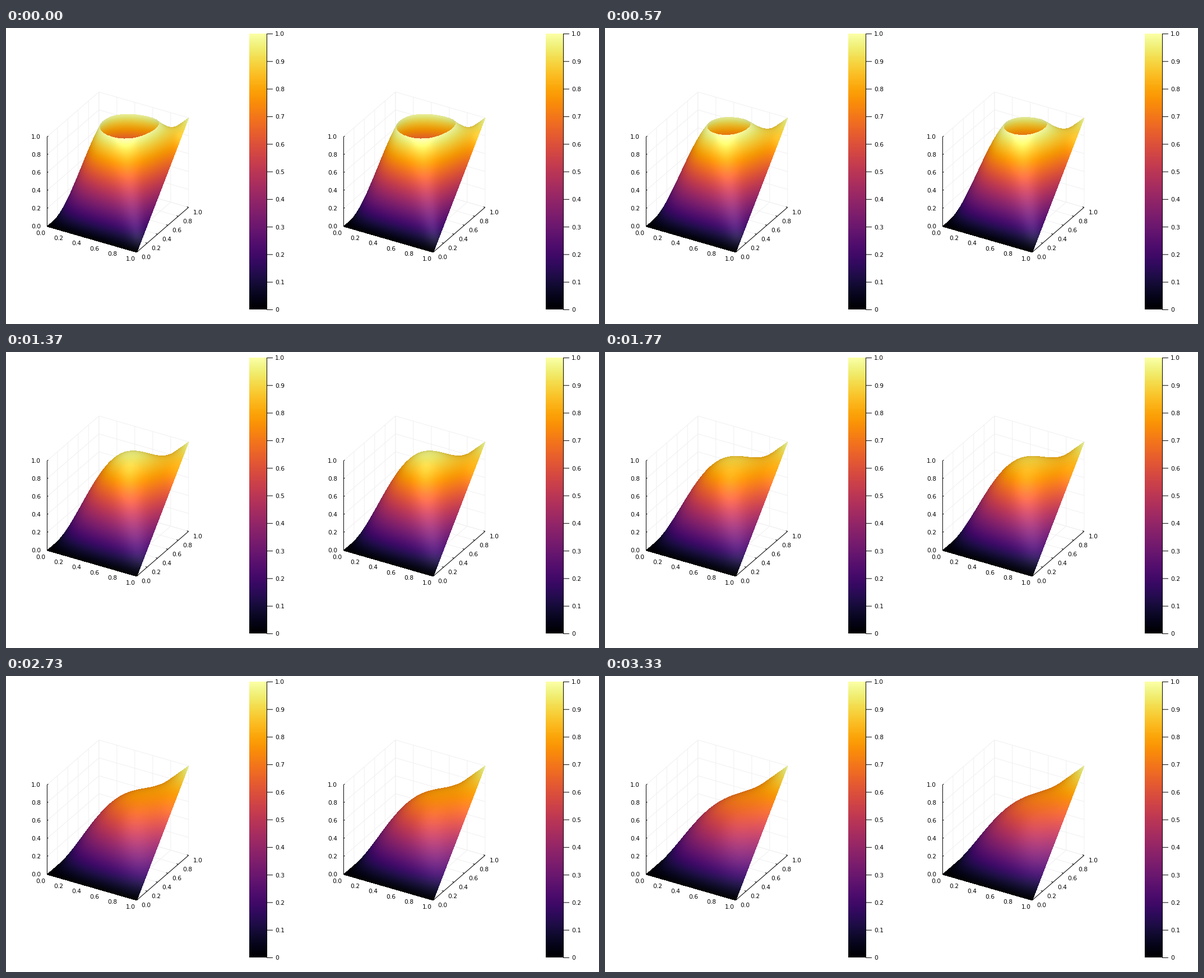
These frames come from a looping animation (1058x529 px, 3360 ms). A matplotlib script:

```python
import numpy as np
import matplotlib.pyplot as plt
from matplotlib.animation import FuncAnimation

W, H, DPI = 1058, 529, 100
FRAMES, LOOP_MS = 101, 3360
PANEL = 529
PX = 72 / DPI                      # one pixel in points
SCALE = 184.75                     # pixels per unit length
ORIGIN = np.array([73.4, 354.3])
DECAY = 2 * np.pi**2 * 0.05        # heat equation, diffusivity 0.05, t in [0, 1]
TICKS = np.arange(6) / 5

plt.rcParams["font.family"] = "DejaVu Sans"
inferno = plt.get_cmap("inferno")
LUT = inferno(np.arange(256))[:, :3]

# Orthographic camera: azimuth 30 degrees, elevation 30 degrees
C, S = np.cos(np.pi / 6), np.sin(np.pi / 6)
RIGHT = np.array([C, S, 0])
UP = np.array([-S * S, C * S, C])
VIEW = np.cross(RIGHT, UP)


def project(x, y, z):
    sx = ORIGIN[0] + SCALE * (RIGHT[0] * x + RIGHT[1] * y)
    sy = ORIGIN[1] - SCALE * (UP[0] * x + UP[1] * y + UP[2] * z)
    return sx, sy


# Surface samples, ordered from back to front
gx, gy = np.meshgrid(np.linspace(0, 1, 400), np.linspace(0, 1, 850))
order = np.argsort((VIEW[0] * gx + VIEW[1] * gy).ravel(), kind="stable")
gx, gy = gx.ravel()[order], gy.ravel()[order]
base = gx * gy
hump = np.sin(np.pi * gx) * np.sin(np.pi * gy)
hump_x = np.pi * np.cos(np.pi * gx) * np.sin(np.pi * gy)
hump_y = np.pi * np.sin(np.pi * gx) * np.cos(np.pi * gy)

LEFT, TOP, IW, IH = 70, 110, 260, 296
flat_x, flat_y = project(gx, gy, 0)
col = np.floor(flat_x).astype(int) - LEFT
row0 = flat_y - TOP + 0.5          # sample at pixel centres
samples = np.arange(gx.size)


def render(t):
    amp = np.exp(-DECAY * t)
    u = base + amp * hump
    row = (row0 - SCALE * UP[2] * u).astype(int)
    inside = u <= 1.0001
    nearest = np.full(IW * IH, -1)
    nearest[(row * IW + col)[inside]] = samples[inside]

    hit = nearest >= 0
    k = nearest[hit]
    ux = gy[k] + amp * hump_x[k]
    uy = gx[k] + amp * hump_y[k]
    facing = np.abs(VIEW[2] - VIEW[0] * ux - VIEW[1] * uy)
    facing /= np.sqrt(1 + ux**2 + uy**2)
    level = np.clip(u[k] * 255, 0, 255).astype(int)
    light = (0.84 + 0.16 * facing)[:, None]
    gloss = (0.12 * facing**20)[:, None]

    image = np.zeros((IW * IH, 4))
    image[hit, :3] = np.clip(LUT[level] * light + gloss, 0, 1)
    image[hit, 3] = 1
    return image.reshape(IH, IW, 4)


fig = plt.figure(figsize=(W / DPI, H / DPI), dpi=DPI, facecolor="white")
ax = fig.add_axes([0, 0, 1, 1])
ax.axis("off")


def segment(p, q, dx, color="black", z=4):
    ax.plot([p[0] + dx, q[0] + dx], [p[1], q[1]], color=color, lw=PX,
            zorder=z, solid_capstyle="butt", snap=False)


def label(x, y, text, ha="center"):
    ax.text(x, y + 3.9, text, fontsize=10.67 * PX, ha=ha, va="baseline")


def draw_grid(dx):
    for v in TICKS:
        for a, b in (
            ((v, 0, 0), (v, 1, 0)), ((v, 1, 0), (v, 1, 1)),
            ((0, v, 0), (1, v, 0)), ((0, v, 0), (0, v, 1)),
            ((0, 0, v), (0, 1, v)), ((0, 1, v), (1, 1, v)),
        ):
            segment(project(*a), project(*b), dx, "#f0f0f0", 1)


def draw_axes(dx):
    corner = project(1, 0, 0)
    segment(project(0, 0, 0), project(0, 0, 1), dx)
    segment(project(0, 0, 0), corner, dx)
    segment(corner, project(1, 1, 0), dx)
    for v in TICKS:
        text = f"{v:.1f}"
        x, y = project(v, 0, 0)
        segment((x, y), (x + 2, y - 1.7), dx)
        label(x + dx - 11.2, y + 11.8, text)
        x, y = project(1, v, 0)
        segment((x, y), (x - 3, y - 0.9), dx)
        label(x + dx + 16.1, y + 9, text)
        x, y = project(0, 0, v)
        segment((x, y), (x + 2, y - 1.2), dx)
        label(x + dx - 11.4, y - 0.5, text, "right")


def draw_colorbar(dx):
    top, bottom, left, right = 10.5, 503.5, 434, 465.5
    ax.imshow(LUT[::-1, None], extent=(left + dx, right + dx, bottom, top),
              aspect="auto", interpolation="nearest", zorder=2)
    segment((right, top - 0.5), (right, bottom + 0.5), dx)
    for i in range(11):
        y = bottom + (top - bottom) * i / 10
        segment((right, y), (right + 10.5, y), dx)
        label(480.3 + dx, y, f"{i / 10:.1f}" if i else "0", "left")


surfaces = []
for offset in (0, PANEL):
    draw_grid(offset)
    draw_axes(offset)
    draw_colorbar(offset)
    surfaces.append(ax.imshow(
        render(0), extent=(LEFT + offset, LEFT + IW + offset, TOP + IH, TOP),
        aspect="auto", interpolation="nearest", zorder=3))
ax.set_xlim(0, W)
ax.set_ylim(H, 0)


def update(frame):
    image = render(frame / (FRAMES - 1))
    for surface in surfaces:
        surface.set_data(image)
    return surfaces


anim = FuncAnimation(fig, update, frames=FRAMES, interval=LOOP_MS / FRAMES,
                     repeat=True, repeat_delay=0, blit=False)
plt.show()
```
